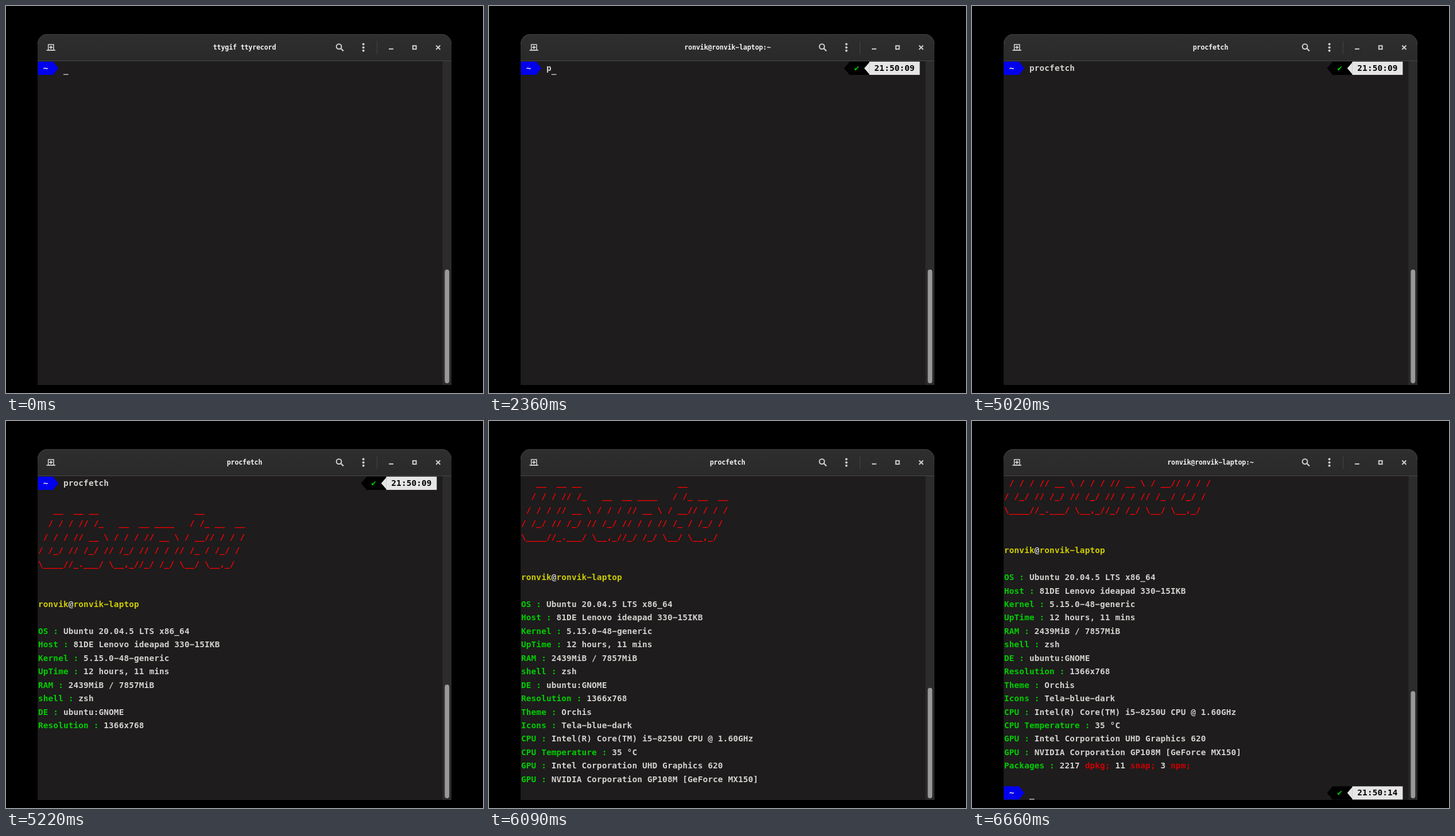
Write an HTML page with a canvas that moves like this. It is 831 px wide and 674 px high and loops after 8.14 s.

```html
<!DOCTYPE html>
<html lang="en">
<head>
<meta charset="utf-8">
<title>Terminal</title>
<style>
  html, body { margin: 0; width: 100%; height: 100%; overflow: hidden; background: #000; }
  canvas { display: block; }
</style>
</head>
<body>
<canvas id="stage" width="831" height="674"></canvas>
<script>
const ctx = document.getElementById('stage').getContext('2d');
const LOOP = 8140;
const X0 = 56, Y0 = 96.5, CW = 8.79, RH = 23.45;
const MONO = '"DejaVu Sans Mono", "DejaVu Sans", monospace';
const FG = '#d3d3cf', GREEN = '#00cd00', YELLOW = '#cdcd00', RED = '#cd0000',
      BRIGHT = '#ff0000', BLUE = '#0000ee', WHITE = '#e5e5e5', ICON = '#cfcfcf';

const USER = 'ronvik', HOST = 'ronvik-laptop';
const COMMAND = 'procfetch';
const KEYS = [2360, 2570, 2690, 2850, 3250, 3450, 3680, 3840, 3960];

const ART = [
  '   __  __ __                   __',
  '  / / / // /_   __  __ ____   / /_ __  __',
  ' / / / // __ \\ / / / // __ \\ / __// / / /',
  '/ /_/ // /_/ // /_/ // / / // /_ / /_/ /',
  '\\____//_.___/ \\__,_//_/ /_/ \\__/ \\__,_/'
];

const INFO = [
  ['OS', 'Ubuntu 20.04.5 LTS x86_64'],
  ['Host', '81DE Lenovo ideapad 330-15IKB'],
  ['Kernel', '5.15.0-48-generic'],
  ['UpTime', '12 hours, 11 mins'],
  ['RAM', '2439MiB / 7857MiB'],
  ['shell', 'zsh'],
  ['DE', 'ubuntu:GNOME'],
  ['Resolution', '1366x768'],
  ['Theme', 'Orchis'],
  ['Icons', 'Tela-blue-dark'],
  ['CPU', 'Intel(R) Core(TM) i5-8250U CPU @ 1.60GHz'],
  ['CPU Temperature', '35 °C'],
  ['GPU', 'Intel Corporation UHD Graphics 620'],
  ['GPU', 'NVIDIA Corporation GP108M [GeForce MX150]']
];

// Each output line is a list of [colour, text] runs, starting on row 1.
const OUTPUT = [
  [],
  ...ART.map(line => [[BRIGHT, line]]),
  [], [],
  [[YELLOW, USER], [FG, '@'], [YELLOW, HOST]],
  [],
  ...INFO.map(([label, value]) => [[GREEN, label + ' : '], [FG, value]]),
  [[GREEN, 'Packages : '], [FG, '2217 '], [RED, 'dpkg; '], [FG, '11 '],
   [RED, 'snap; '], [FG, '3 '], [RED, 'npm;']]
];

// [time, output lines printed, rows scrolled]
const PRINTS = [
  [0, 0, 0], [5120, 16, 0], [5200, 18, 0], [5280, 19, 0], [5360, 20, 0],
  [5440, 22, 0], [6090, 24, 2], [6560, 25, 4]
];

const col = c => X0 + c * CW;
const row = r => Y0 + r * RH;

function rect(x, y, w, h, color) {
  ctx.fillStyle = color;
  ctx.fillRect(x, y, w, h);
}

function poly(color, ...pts) {
  ctx.fillStyle = color;
  ctx.beginPath();
  pts.forEach(([x, y]) => ctx.lineTo(x, y));
  ctx.fill();
}

function line(width, ...pts) {
  ctx.strokeStyle = ICON;
  ctx.lineWidth = width;
  ctx.beginPath();
  pts.forEach(([x, y], i) => i % 2 ? ctx.lineTo(x, y) : ctx.moveTo(x, y));
  ctx.stroke();
}

// Fixed-pitch text with a wide hyphen.
function cells(str, x, base, pitch, size, color) {
  ctx.font = `bold ${size}px ${MONO}`;
  ctx.fillStyle = color;
  [...str].forEach((ch, i) => {
    const cx = x + i * pitch;
    if (ch === '-') ctx.fillRect(cx + pitch * 0.08, base - size * 0.37, pitch * 0.84, size * 0.12);
    else if (ch !== ' ') ctx.fillText(ch, cx, base);
  });
}

function print(str, c, r, color) {
  cells(str, col(c), Math.round(row(r) + 16.4), CW, 14.4, color);
}

function cursor(c, r) {
  rect(col(c), row(r) + 22.1, CW, 1.3, FG);
}

function leftPrompt(r) {
  const y = row(r) + 0.4, h = RH - 0.4;
  rect(X0 - 0.5, y, 3 * CW + 0.5, h, BLUE);
  poly(BLUE, [col(3) - 0.3, y], [col(4), y + h / 2], [col(3) - 0.3, y + h]);
  print('~', 1, r, WHITE);
}

function rightPrompt(r, clock) {
  const y = row(r) + 0.4, h = RH - 0.4, mid = y + h / 2;
  poly('#000', [col(65) + 0.3, y + 1], [col(64), mid], [col(65) + 0.3, y + h - 1]);
  rect(col(65), y, 4 * CW, h, '#000');
  poly(WHITE, [col(69) + 0.3, y + 1], [col(68), mid], [col(69) + 0.3, y + h - 1]);
  rect(col(69), y, 10 * CW, h, WHITE);
  print('✔', 66, r, GREEN);
  print(clock, 70, r, '#000');
}

function windowPath() {
  ctx.beginPath();
  ctx.roundRect(55, 49, 721, 611, [17, 17, 0, 0]);
}

function icons() {
  ctx.strokeStyle = ICON;
  ctx.lineWidth = 1.6;
  ctx.strokeRect(73.7, 67.2, 9.2, 9.6);
  rect(70.5, 76.2, 15.5, 1.7, ICON);
  line(1.8, [75.4, 72], [81.2, 72], [78.3, 69.1], [78.3, 74.9]);

  ctx.lineWidth = 2;
  ctx.beginPath();
  ctx.arc(580, 70.6, 4.4, 0, 7);
  ctx.stroke();
  line(2.2, [583.2, 73.8], [587.8, 78.4]);

  ctx.fillStyle = ICON;
  for (const y of [66.6, 72.2, 77.8]) {
    ctx.beginPath();
    ctx.arc(622.6, y, 2, 0, 7);
    ctx.fill();
  }
  rect(646, 61, 1, 23, '#434343');

  rect(667, 73.8, 7.8, 2, ICON);
  ctx.lineWidth = 2;
  ctx.strokeRect(708.8, 69.3, 5.8, 5.8);
  line(2, [749.3, 68.7], [756.4, 75.8], [756.4, 68.7], [749.3, 75.8]);
}

function frame(title, scroll) {
  rect(0, 0, 831, 674, '#000');
  ctx.save();
  windowPath();
  ctx.clip();
  rect(55, 49, 721, 611, '#1e1c1d');
  const head = ctx.createLinearGradient(0, 49, 0, 95);
  head.addColorStop(0, '#2e2e2e');
  head.addColorStop(1, '#2a2a2a');
  rect(55, 49, 721, 46, head);
  rect(760.5, 96, 15.5, 564, '#2c2c2c');
  rect(55, 95, 721, 1, '#474747');
  ctx.restore();

  ctx.save();
  ctx.beginPath();
  ctx.rect(55, 49, 721, 18);
  ctx.clip();
  ctx.beginPath();
  ctx.roundRect(55.5, 49.5, 720, 80, 16.5);
  ctx.strokeStyle = '#414141';
  ctx.lineWidth = 1;
  ctx.stroke();
  ctx.restore();

  const top = 459 + scroll * 2.9;
  ctx.fillStyle = '#999';
  ctx.beginPath();
  ctx.roundRect(764.4, top, 7.8, 657 - top, 3.9);
  ctx.fill();

  icons();
  cells(title, 415.5 - title.length * 3.42, 76, 6.84, 11.7, '#f2f2f2');
}

function titleAt(t) {
  if (t < 470) return 'ttygif ttyrecord';
  if (t >= 5020 && t < 6660) return COMMAND;
  return USER + '@' + HOST + ':~';
}

function draw(t) {
  const [, count, scroll] = PRINTS.filter(p => p[0] <= t).pop();
  frame(titleAt(t), scroll);

  ctx.save();
  ctx.beginPath();
  ctx.rect(55, 96, 705, 564);
  ctx.clip();

  if (scroll === 0) {
    if (t < 370 || t >= 570) leftPrompt(0);
    if (t >= 570) rightPrompt(0, '21:50:09');
    const typed = KEYS.filter(k => k <= t).length;
    print(COMMAND.slice(0, typed), 5, 0, FG);
    if (t < 3450) cursor(t >= 370 && t < 570 ? 0 : 5 + typed, 0);
  }

  OUTPUT.slice(0, count).forEach((runs, i) => {
    const r = i + 1 - scroll;
    if (r < 0) return;
    let c = 0;
    for (const [color, str] of runs) {
      print(str, c, r, color);
      c += str.length;
    }
  });

  if (t >= 6660) {
    leftPrompt(23);
    rightPrompt(23, '21:50:14');
    cursor(5, 23);
  }
  ctx.restore();
}

const start = performance.now();
function tick() {
  draw((performance.now() - start) % LOOP);
  requestAnimationFrame(tick);
}
tick();
</script>
</body>
</html>
```
